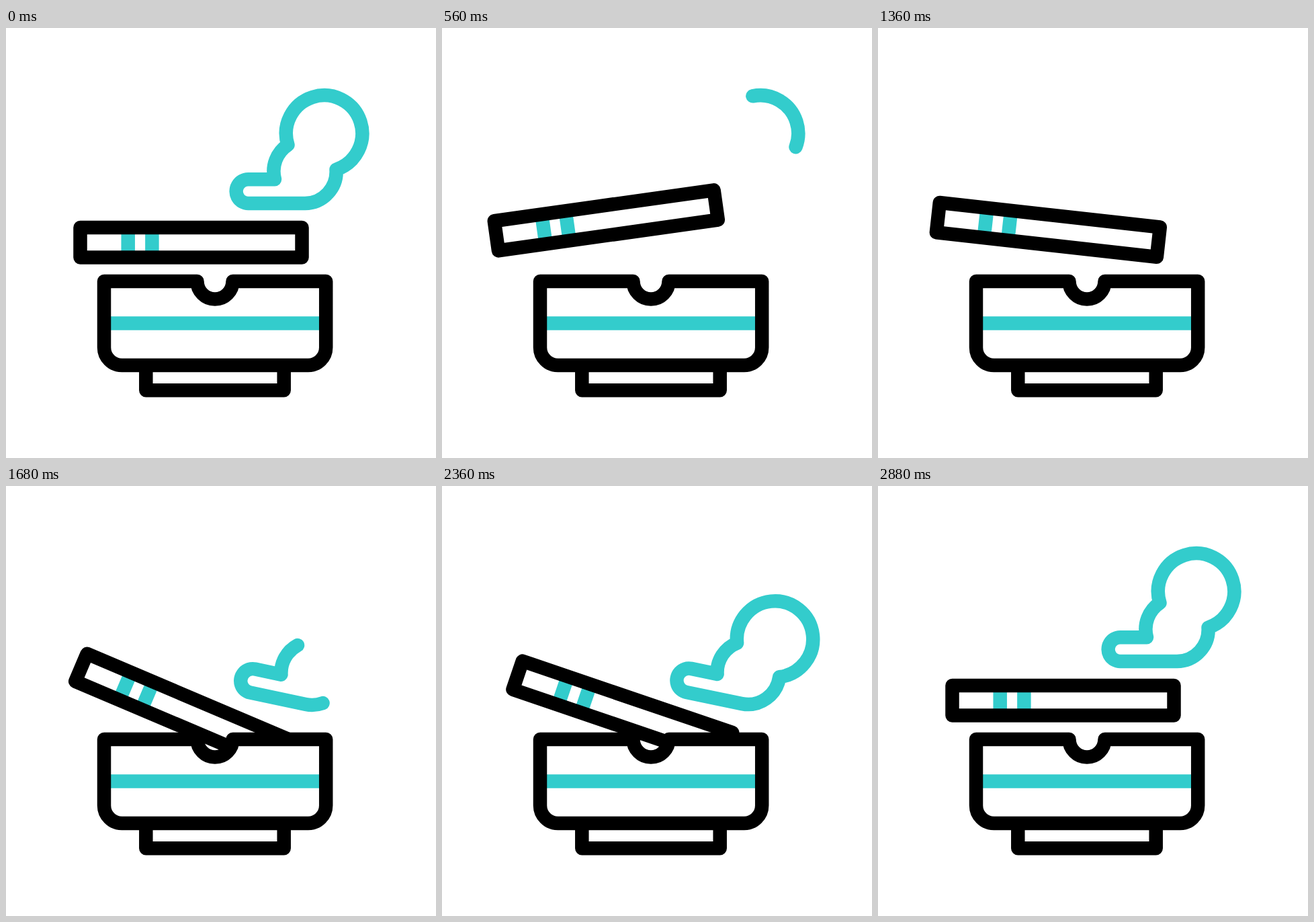
Recreate the animation shown at these times as an HTML page. Size 640 px wide and 640 px high, loop 3 s.

```html
<!DOCTYPE html>
<html lang="en">
<head>
<meta charset="utf-8">
<title>Ashtray</title>
<style>
  html, body { margin: 0; width: 100%; height: 100%; overflow: hidden; background: #fff; }
  svg { display: block; width: 100%; height: 100%; }
  .ink, .teal { stroke-width: 20.5; stroke-linecap: round; stroke-linejoin: round; fill: none; }
  .ink { stroke: #000; }
  .teal { stroke: #3cc; }
  .flat { stroke-linecap: butt; }
  .solid { fill: #fff; }
</style>
</head>
<body>
<svg viewBox="0 0 640 640">
  <path id="smoke" class="teal" d="M345.2 252.3A17.9 17.9 0 0 1 360.6 225.2H400A47 47 0 0 1 419.5 174A56.7 56.7 0 1 1 491.5 210.7A47 47 0 0 1 445 261H360.6A17.9 17.9 0 0 1 345.2 252.3"/>
  <g id="cigarette">
    <rect class="solid" x="-165" y="-22.3" width="330" height="44.6"/>
    <path class="teal flat" d="M-93.8 -22V22M-58.1 -22V22"/>
    <rect class="ink" x="-165" y="-22.3" width="330" height="44.6"/>
  </g>
  <path class="ink solid" d="M208.3 502V539.3H413.7V502"/>
  <path class="solid" id="bowlFill"/>
  <path class="teal flat" d="M146 439.5H476"/>
  <path class="ink" id="bowl" d="M284.5 377H146V475.5A26.5 26.5 0 0 0 172.5 502H449.7A26.5 26.5 0 0 0 476.2 475.5V377H337.5A26.5 26.5 0 0 1 284.5 377Z"/>
</svg>
<script>
const LOOP = 3000, STEP = 40;
const $ = id => document.getElementById(id);
const smoke = $('smoke'), cigarette = $('cigarette');
const smokeLength = smoke.getTotalLength();
$('bowlFill').setAttribute('d', $('bowl').getAttribute('d'));

const ease = u => u * u * (3 - 2 * u);

// Each move is [start, end, value]; the track eases to every value in turn.
function track(first, ...moves) {
  return t => moves.reduce((value, [start, end, to]) => {
    const u = Math.min(1, Math.max(0, (t - start) / (end - start)));
    return value + (to - value) * ease(u);
  }, first);
}

const cig = {
  x: track(275.5, [0, 540, 244.3], [1120, 1625, 263.8], [2180, 2600, 276.5], [2600, 2880, 275.5]),
  y: track(319.2, [0, 690, 283], [1120, 1750, 336.5], [2240, 2880, 319.2]),
  angle: track(0, [0, 575, -8], [1120, 1625, 23], [2165, 2880, 0])
};
const puff = {
  x: track(22, [2370, 2880, 0]),
  y: track(72, [2320, 2880, 0]),
  angle: track(11.9, [2320, 2880, 0]),
  shown: track(1, [30, 780, 0], [1360, 2050, 1])
};

function drawSmoke(t) {
  const shown = puff.shown(t), growing = t >= 1120;
  smoke.style.display = shown > 0.001 ? '' : 'none';
  smoke.setAttribute('transform', growing
    ? `translate(${puff.x(t)} ${puff.y(t)}) rotate(${puff.angle(t)} 473 156.8)`
    : '');
  if (shown > 0.999) {
    smoke.removeAttribute('stroke-dasharray');
    return;
  }
  // Erases from both ends of the outline, then grows back from the same ends.
  const half = smokeLength * shown / 2, gap = smokeLength - 2 * half;
  smoke.setAttribute('stroke-dasharray', growing
    ? `${half} ${gap} ${half} ${smokeLength}`
    : `0 ${gap / 2} ${2 * half} ${smokeLength}`);
  if (!growing) {
    // Skip the zero-length dash, which would leave a dot at the start.
    smoke.setAttribute('stroke-dasharray', `${2 * half} ${2 * smokeLength}`);
    smoke.setAttribute('stroke-dashoffset', -gap / 2);
  } else {
    smoke.setAttribute('stroke-dashoffset', 0);
  }
}

function draw(t) {
  cigarette.setAttribute('transform',
    `translate(${cig.x(t)} ${cig.y(t)}) rotate(${cig.angle(t)})`);
  drawSmoke(t);
}

const begin = performance.now();
function tick() {
  const t = (performance.now() - begin) % LOOP;
  draw(Math.floor(t / STEP) * STEP);
  requestAnimationFrame(tick);
}
tick();
</script>
</body>
</html>
```
